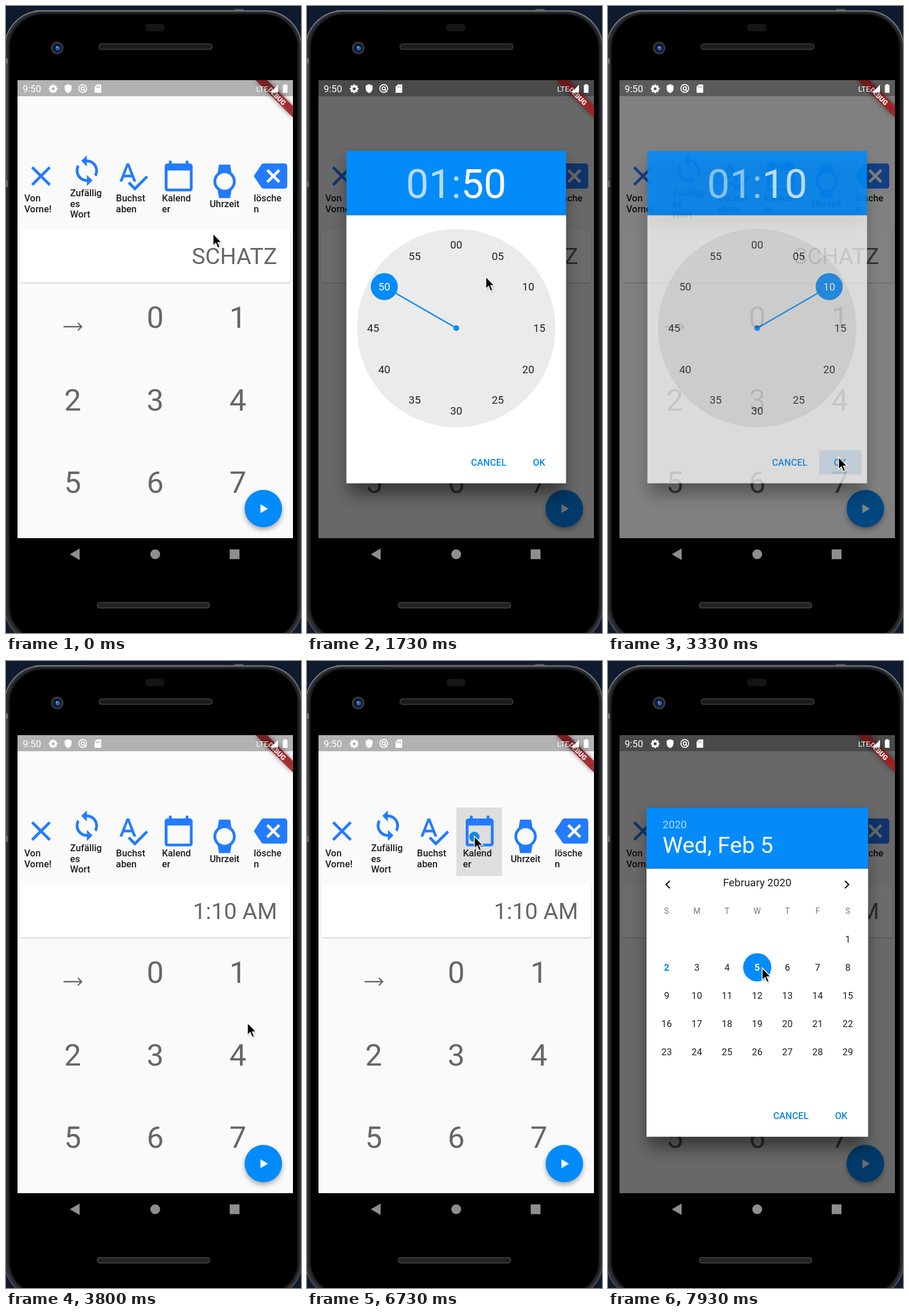
An HTML page for the animation above (8 s loop, 513 by 1091 pixels).

```html
<!DOCTYPE html>
<html lang="de">
<head>
<meta charset="utf-8">
<title>Phone pickers</title>
<style>
html, body { margin: 0; width: 100%; height: 100%; overflow: hidden; background: #0f1a2f; }
svg { display: block; width: 100vw; height: 100vh; font-family: Roboto, sans-serif; }
.mid { text-anchor: middle; }
.bold { font-weight: 500; }
</style>
</head>
<body>
<svg id="stage" viewBox="0 0 513 1091" preserveAspectRatio="none"></svg>
<script>
const LOOP = 8000, STEP = 1000 / 15;
const BLUE = '#038bfb', ICON = '#237bff', SCRIM = 0.58;
const DIAL = { x: 259.5, y: 560.5, outer: 144.5, inner: 102.5 };
const CELL = 79.83, KEY = 143.6;

const T = {
  clockTap: 400, clockOpen: 520, hourTap: 1330, minuteTap: 2359,
  okTap: 3150, clockClose: 3262, result: 3390,
  calTap: 6700, calOpen: 6840, dayTap: 7850
};

// Pointer stops: time, x, y
const POINTER = [
  [0, 360, 396], [290, 380, 312], [480, 380, 312], [1070, 331, 445], [1290, 311, 471],
  [1800, 311, 471], [2330, 372, 485], [2620, 372, 485], [3070, 401, 785], [3450, 401, 785],
  [4200, 443, 440], [5250, 443, 440], [5870, 420, 400], [6070, 420, 400],
  [6600, 291, 305], [6980, 291, 305], [7730, 268, 534], [LOOP, 268, 534]
];

const ICONS = {
  close: 'M19 6.41L17.59 5 12 10.59 6.41 5 5 6.41 10.59 12 5 17.59 6.41 19 12 13.41 17.59 19 19 17.59 13.41 12z',
  sync: 'M12 4V1L8 5l4 4V6c3.31 0 6 2.69 6 6 0 1.01-.25 1.97-.7 2.8l1.46 1.46C19.54 15.03 20 13.57 20 12c0-4.42-3.58-8-8-8zm0 14c-3.31 0-6-2.69-6-6 0-1.01.25-1.97.7-2.8L5.24 7.74C4.46 8.97 4 10.43 4 12c0 4.42 3.58 8 8 8v3l4-4-4-4v3z',
  spell: 'M12.45 16h2.09L9.43 3H7.57L2.46 16h2.09l1.12-3h5.64l1.14 3zm-6.02-5L8.5 5.48 10.57 11H6.43zm15.16.59l-8.09 8.09L9.83 16l-1.41 1.41 5.09 5.09L23 13l-1.41-1.41z',
  calendar: 'M20 3h-1V1h-2v2H7V1H5v2H4c-1.1 0-2 .9-2 2v16c0 1.1.9 2 2 2h16c1.1 0 2-.9 2-2V5c0-1.1-.9-2-2-2zm0 18H4V8h16v13z',
  watch: 'M20 12c0-2.54-1.19-4.81-3.04-6.27L16 0H8l-.95 5.73C5.19 7.19 4 9.45 4 12s1.19 4.81 3.05 6.27L8 24h8l.96-5.73C18.81 16.81 20 14.54 20 12zM6 12c0-3.31 2.69-6 6-6s6 2.69 6 6-2.69 6-6 6-6-2.69-6-6z',
  back: 'M22 3H7c-.69 0-1.23.35-1.59.88L0 12l5.41 8.11c.36.53.9.89 1.59.89h15c1.1 0 2-.9 2-2V5c0-1.1-.9-2-2-2zm-3 12.59L17.59 17 14 13.41 10.41 17 9 15.59 12.59 12 9 8.41 10.41 7 14 10.59 17.59 7 19 8.41 15.41 12 19 15.59z'
};

const ACTIONS = [
  ['close', 'Von', 'Vorne!'],
  ['sync', 'Zufällig', 'es', 'Wort'],
  ['spell', 'Buchst', 'aben'],
  ['calendar', 'Kalend', 'er'],
  ['watch', 'Uhrzeit'],
  ['back', 'lösche', 'n']
];

const range = (n, f) => Array.from({ length: n }, (_, i) => f(i)).join('');
const pad = n => String(n).padStart(2, '0');
const rect = (x, y, w, h, fill, more = '') =>
  `<rect x="${x}" y="${y}" width="${w}" height="${h}" fill="${fill}" ${more}/>`;
const circle = (x, y, r, fill, more = '') =>
  `<circle cx="${x}" cy="${y}" r="${r}" fill="${fill}" ${more}/>`;
const path = (d, fill, more = '') => `<path d="${d}" fill="${fill}" ${more}/>`;
const text = (x, y, size, s, more = '') =>
  `<text x="${x}" y="${y}" font-size="${size}" ${more}>${s}</text>`;

// Icon over its label, the pair centred in the cell
function action([icon, ...lines], i) {
  const x = 60.8 + CELL * i, y = 314.5 - lines.length * 9.3;
  const single = lines.length === 1;
  return path(ICONS[icon], ICON, `transform="translate(${x} ${y}) scale(2.428) translate(-12 -12)"`) +
    lines.map((s, n) => text(single ? x : x - 29.1, y + 44.3 + n * 18.6, 16.3, s,
      `class="bold ${single ? 'mid' : ''}" fill="#1c1c1c"`)).join('');
}

function polar(deg, r) {
  const a = deg * Math.PI / 180;
  return [DIAL.x + r * Math.sin(a), DIAL.y - r * Math.cos(a)];
}

function ring(r, label) {
  return range(12, i => {
    const [x, y] = polar(i * 30, r);
    return text(x, y + 6.3, 18.65, label(i), 'class="mid"');
  });
}

const hourLabels = () =>
  ring(DIAL.outer, i => pad(i ? i + 12 : 0)) + ring(DIAL.inner, i => pad(i || 12));
const minuteLabels = () => ring(DIAL.outer, i => pad(i * 5));
const dialLabels = fill =>
  `<g fill="${fill}"><g class="hours">${hourLabels()}</g><g class="minutes">${minuteLabels()}</g></g>`;

const shadowBox = (x, y, w, h) =>
  rect(x + 3, y + 16, w - 6, h + 4, '#000', 'opacity=".45" filter="url(#soft)"');

const buttons = (x, y) =>
  `<g class="bold mid" fill="#0588ea">${text(x, y, 16.3, 'CANCEL')}${text(x + 87.5, y, 16.3, 'OK')}</g>`;

function frame() {
  return rect(0, 0, 513, 1091, '#0f1a2f') +
    rect(135, 6, 263, 4, '#24262b') + rect(50, 7, 86, 3, '#4a4b4f') + rect(397, 5, 16, 5, '#515256') +
    rect(-2, 8.5, 516, 1101, '#2e2f32', 'rx="64" stroke="url(#rim)" stroke-width="2"') +
    rect(0, 90, 4, 225, '#45464a') + rect(0, 92, 3, 8, '#77787a') + rect(0, 304, 3, 11, '#6a6b6d') +
    rect(5, 13, 503.5, 1091, '#000', 'rx="60" stroke="#1c1d1f" stroke-width="3"') +
    rect(242, 31, 34, 13, '#151515', 'rx="6"') +
    circle(89, 73, 11, '#37383a') + circle(89, 73, 8, '#101a33') +
    circle(90, 73.5, 3.8, '#2f5fb5') + circle(88.5, 71.5, 1.3, '#a7c4ee') +
    rect(161.7, 66, 196.6, 9.5, '#1c1c1c', 'rx="4.7" stroke="#424242" stroke-width="1.5"') +
    rect(158.7, 1038, 195.6, 9.5, '#222', 'rx="4.7" stroke="#464646" stroke-width="1.5"') +
    path('M111 954L128 944V964Z', '#8e8e8e') + circle(259.5, 954, 8.5, '#8e8e8e') +
    rect(389, 945.5, 17, 17, '#8e8e8e');
}

function key(n) {
  const slot = n + 1;
  return text(116 + slot % 3 * KEY, 560 + Math.floor(slot / 3) * KEY, 52.4, n, 'class="mid" fill="#666"');
}

function home() {
  return rect(20, 129, 479, 797, '#fafafa') +
    `<g id="press" clip-path="url(#cell)">${rect(0, 255, CELL, 119, '#dedede', 'id="pressBox"')}${circle(0, 0, 0, '#1587e0', 'id="splash"')}</g>` +
    ACTIONS.map(action).join('') +
    rect(25.5, 390, 469, 92, '#000', 'rx="4" opacity=".25" filter="url(#thin)"') +
    rect(25, 389, 469.5, 92, '#fff', 'rx="4"') +
    text(471.5, 449, 39.6, '', 'id="entry" text-anchor="end" fill="#666"') +
    path('M100 558H131M125 551.5L131.500 558L125 564.500', 'none', 'stroke="#666" stroke-width="2.3"') +
    range(8, key) +
    circle(447.5, 879, 32, '#000', 'opacity=".36" filter="url(#fabSoft)"') +
    circle(447.5, 874.5, 32.6, BLUE) + path('M442.5 867V882.5L455.5 874.7Z', '#fff');
}

function statusBar() {
  const band = 'M434 129H454L499 174V194Z';
  const gear = range(8, i => rect(80.3, 136.5, 3.4, 4, '#fff', `transform="rotate(${i * 45} 82 144)"`));
  return path(band, '#000', 'opacity=".5" filter="url(#bandSoft)"') +
    path(band, '#a81f24', 'opacity=".88"') +
    text(0, 4.2, 11.9, 'DEBUG', 'class="mid" font-weight="900" fill="#fff" transform="translate(471.2 157) rotate(45)"') +
    rect(20, 129, 479, 28, '#000', 'opacity=".29"') +
    `<g fill="#fff">${text(29, 149.5, 16.6, '9:50')}${text(435, 148.5, 13.5, 'LTE')}</g>` +
    gear + circle(82, 144, 4.2, 'none', 'stroke="#fff" stroke-width="3.2"') +
    path('M108 136L114 138.6V143C114 147.2 111.6 150.3 108 151.6C104.4 150.3 102 147.2 102 143V138.6Z', '#fff') +
    circle(133.5, 143.5, 6.8, 'none', 'stroke="#fff" stroke-width="1.7"') +
    circle(133.5, 143.5, 2.8, 'none', 'stroke="#fff" stroke-width="1.7"') +
    path('M135.5 145.5L139 149.5', 'none', 'stroke="#fff" stroke-width="1.8"') +
    path('M158 136.5H165.5V151H154V140.5Z', '#fff') +
    path('M157 140V143M159.7 139V143M162.3 139V143', 'none', 'stroke="#999" stroke-width="1"') +
    path('M473 137V150.5H460Z', '#fff') +
    path('M483.5 136H487.5V137.5H489.5V151H481.5V137.5H483.5Z', '#fff');
}

function clockDialog() {
  return rect(68.5, 252.2, 382, 112, BLUE, 'id="clockHead"') +
    `<g id="clock">${shadowBox(69, 364, 381.5, 466)}${rect(68.5, 364.2, 382, 466.3, '#fff')}` +
    `<g fill="#fff">${text(251, 334, 70, '', 'id="hh" text-anchor="end"')}` +
    `${text(259.5, 334, 70, ':', 'class="mid" opacity=".7"')}${text(268, 334, 70, '', 'id="mm"')}</g>` +
    circle(DIAL.x, DIAL.y, 172.5, '#ebebeb') + dialLabels('#1f1f1f') +
    circle(DIAL.x, DIAL.y, 5, BLUE) +
    `<line id="hand" x1="${DIAL.x}" y1="${DIAL.y}" stroke="${BLUE}" stroke-width="2.4"/>` +
    circle(0, 0, 23.5, BLUE, 'id="knob"') +
    `<g clip-path="url(#knobClip)">${dialLabels('#fff')}</g>` +
    rect(367, 773, 74, 42, '#7fb4e4', 'id="okPress" rx="2" opacity=".27"') +
    buttons(316, 799.5) + '</g>';
}

function dateDialog() {
  const col = i => 102 + i * 52.5;
  const day = n => {
    const slot = n + 5;
    return text(col(slot % 7), 489.7 + Math.floor(slot / 7) * 49, 16.3, n, `class="mid" id="day${n}" fill="#1f1f1f"`);
  };
  return rect(67, 255.3, 385.3, 106.2, BLUE, 'id="dateHead"') +
    `<g id="date">${shadowBox(67, 361, 385, 466)}${rect(67, 361.5, 385.3, 466.3, '#fff')}` +
    `<g fill="#fff">${text(95, 291, 18.65, '2020', 'opacity=".7"')}${text(95, 334, 39.6, '', 'id="picked"')}</g>` +
    text(259.5, 392, 18.65, 'February 2020', 'class="mid" fill="#1f1f1f"') +
    path('M107.5 382.5L101 389L107.5 395.5M412 382.5L418.5 389L412 395.5', 'none', 'stroke="#1c1c1c" stroke-width="2.4"') +
    range(7, i => text(col(i), 440, 14, 'SMTWTFS'[i], 'class="mid" fill="#777"')) +
    circle(0, 533, 24.5, BLUE, 'id="dayDot"') +
    range(29, i => day(i + 1)) + buttons(318, 796.5) + '</g>';
}

const blur = (id, s) =>
  `<filter id="${id}" x="-50%" y="-50%" width="200%" height="200%"><feGaussianBlur stdDeviation="${s}"/></filter>`;

// Both dialogs share one upper shadow, drawn behind the header
const headShadow = id => `<g id="${id}">${rect(72, 268, 375, 110, '#000', 'opacity=".45" filter="url(#soft)"')}</g>`;

document.getElementById('stage').innerHTML =
  `<defs>${blur('soft', 14)}${blur('thin', 1.2)}${blur('fabSoft', 5)}${blur('tip', 1.5)}${blur('bandSoft', 4)}` +
  `<linearGradient id="rim" x2="0" y2="1"><stop stop-color="#7d7e82"/><stop offset=".1" stop-color="#4c4d51"/><stop offset="1" stop-color="#4a4b4e"/></linearGradient>` +
  `<clipPath id="knobClip">${circle(0, 0, 23.5, '#000', 'id="knobHole"')}</clipPath>` +
  `<clipPath id="cell">${rect(0, 255, CELL, 119, '#000', 'id="cellBox"')}</clipPath>` +
  `<clipPath id="screen">${rect(20, 129, 479, 797, '#000')}</clipPath></defs>` +
  frame() +
  `<g clip-path="url(#screen)">${home()}${rect(20, 129, 479, 797, '#000', 'id="scrim"')}` +
  `${headShadow('headShadow')}${clockDialog()}${dateDialog()}${statusBar()}</g>` +
  `<g id="pointer">${path('M1 2V23L6 18L10 27L13 25.5L9.5 17H16Z', '#000', 'opacity=".3" filter="url(#tip)"')}` +
  path('M0 0V21.3L4.8 16.8L8.3 25L12 23.4L8.5 15.4H15Z', '#000', 'stroke="#fff" stroke-width="1.4"') + '</g>';

const $ = id => document.getElementById(id);
const set = (id, attrs) => { for (const k in attrs) $(id).setAttribute(k, attrs[k]); };
const show = (node, on) => { node.style.display = on ? '' : 'none'; };
const clamp = v => Math.min(1, Math.max(0, v));
const out = (t, p) => 1 - Math.pow(1 - clamp(t), p);

function pointerAt(t) {
  const i = POINTER.findIndex(p => p[0] > t);
  const [t0, x0, y0] = POINTER[i - 1], [t1, x1, y1] = POINTER[i];
  const u = (t - t0) / (t1 - t0), k = u * u * (3 - 2 * u);
  return [x0 + (x1 - x0) * k, y0 + (y1 - y0) * k];
}

function drawPress(t) {
  const cal = t >= T.calTap - 100;
  const dt = t - (cal ? T.calTap : T.clockTap);
  const x = 20 + CELL * (cal ? 3 : 4);
  show($('press'), dt >= 0 && dt < 320);
  set('cellBox', { x });
  set('pressBox', { x, opacity: clamp((320 - dt) / 120) });
  set('splash', {
    cx: cal ? 291 : 380, cy: cal ? 306 : 313,
    r: Math.min(70, Math.max(0, dt) * 0.27), opacity: clamp(1 - (dt - 70) / 180)
  });
}

function drawClock(t) {
  const minutes = t >= T.hourTap;
  let angle = 270 + 30 * out((t - T.hourTap) / 200, 2.1);
  if (t >= T.minuteTap) angle = -60 + 120 * out((t - T.minuteTap) / 200, 2.1);
  const [cx, cy] = polar(angle, DIAL.outer);
  set('hand', { x2: cx, y2: cy });
  set('knob', { cx, cy });
  set('knobHole', { cx, cy });
  document.querySelectorAll('.hours').forEach(g => show(g, !minutes));
  document.querySelectorAll('.minutes').forEach(g => show(g, minutes));
  $('hh').textContent = minutes ? '01' : '21';
  $('mm').textContent = t >= T.minuteTap ? '10' : '50';
  set('hh', { opacity: minutes ? 0.7 : 1 });
  set('mm', { opacity: minutes ? 1 : 0.7 });
  show($('okPress'), t >= T.okTap);
}

function drawDate(t) {
  const later = t >= T.dayTap;
  $('picked').textContent = later ? 'Wed, Feb 5' : 'Sun, Feb 2';
  set('dayDot', { cx: later ? 259.5 : 102 });
  set('day2', { fill: later ? BLUE : '#fff', 'font-weight': 700 });
  set('day5', { fill: later ? '#fff' : '#1f1f1f', 'font-weight': later ? 700 : 400 });
}

// The header keeps its strong blue longer than the body while fading
function fade(id, amount) {
  set(id, { opacity: out(amount, 1.7) });
  set(id + 'Head', { opacity: out(amount, 2.7) });
  show($(id), amount > 0);
}

function draw(t) {
  const clock = Math.min(clamp((t - T.clockOpen) / 150), clamp(1 - (t - T.clockClose) / 150));
  const date = clamp((t - T.calOpen) / 150);
  const dialog = Math.max(clock, date);
  fade('clock', clock);
  fade('date', date);
  set('headShadow', { opacity: out(dialog, 1.7) });
  set('scrim', { opacity: SCRIM * out(dialog, 2.5) });
  $('entry').textContent = t < T.result ? 'SCHATZ' : '1:10 AM';
  drawPress(t);
  drawClock(t);
  drawDate(t);
  set('pointer', { transform: `translate(${pointerAt(t)})` });
}

const start = performance.now();
function tick() {
  const t = (performance.now() - start) % LOOP;
  draw(Math.min(Math.floor((t + 4) / STEP) * STEP, LOOP - STEP));
  requestAnimationFrame(tick);
}
tick();
</script>
</body>
</html>
```
